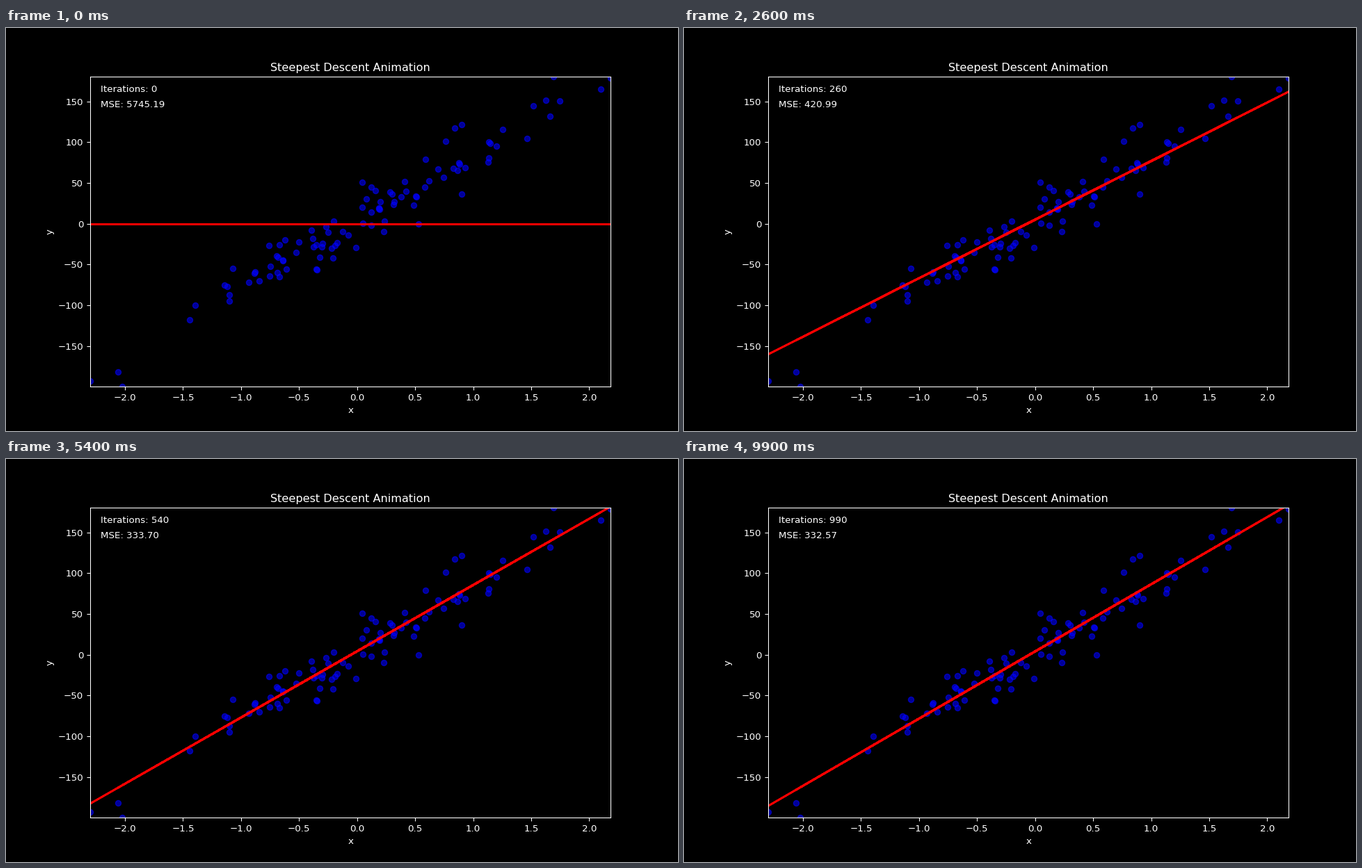
A matplotlib script for the animation above (10000 ms loop, 966 px wide and 580 px high).

```python
import numpy as np
import matplotlib.pyplot as plt
from matplotlib.animation import FuncAnimation

FRAMES = 100
STEPS_PER_FRAME = 10
RATE = 0.01


def make_data(n=100, noise=20, seed=1):
    """Noisy linear data in shuffled order."""
    rng = np.random.RandomState(seed)
    x = rng.standard_normal(n)
    slope = 100 * rng.uniform()
    y = slope * x + rng.normal(scale=noise, size=n)
    order = np.arange(n)
    rng.shuffle(order)
    return x[order], y[order]


def descend(x, y, steps):
    """Intercept and slope after each gradient step, starting from zero."""
    b = w = 0.0
    path = []
    for _ in range(steps):
        path.append((b, w))
        err = b + w * x - y
        b, w = b - RATE * err.mean(), w - RATE * (err * x).mean()
    return path


x, y = make_data()
path = descend(x, y, FRAMES * STEPS_PER_FRAME)

plt.style.use("dark_background")
plt.rcParams["font.family"] = "DejaVu Sans"
fig, ax = plt.subplots(figsize=(10, 6.0042), dpi=96.6)  # 966 x 580 px
ax.set(xlim=(x.min(), x.max()), ylim=(y.min(), y.max()),
       xlabel="x", ylabel="y", title="Steepest Descent Animation")
ax.scatter(x, y, color="blue", alpha=0.6)
line, = ax.plot(x, np.zeros_like(x), color="red", lw=2)
count = ax.text(0.02, 0.95, "", transform=ax.transAxes)
loss = ax.text(0.02, 0.90, "", transform=ax.transAxes)


def update(frame):
    step = frame * STEPS_PER_FRAME
    b, w = path[step]
    fit = b + w * x
    line.set_ydata(fit)
    count.set_text(f"Iterations: {step}")
    loss.set_text(f"MSE: {np.mean((fit - y) ** 2):.2f}")
    return line, count, loss


anim = FuncAnimation(fig, update, frames=FRAMES, interval=100, repeat=True)
plt.show()
```
